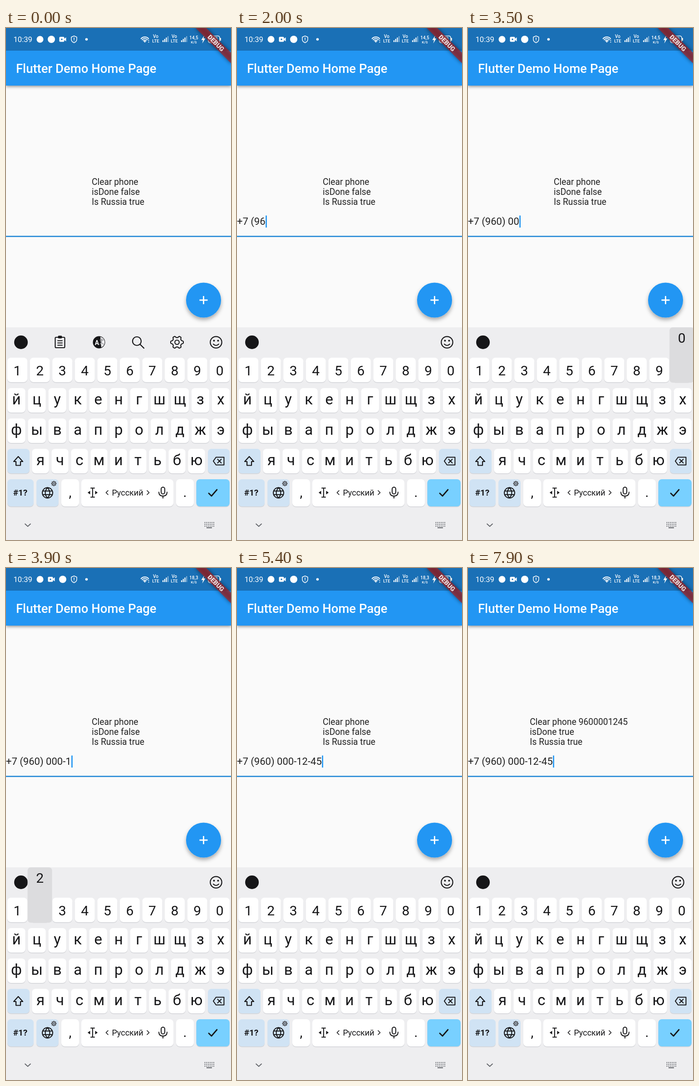
An HTML page for the animation above (8 s loop, 496x1129 px).

```html
<!DOCTYPE html>
<html lang="en">
<head>
<meta charset="utf-8">
<title>Phone field demo</title>
<style>
html, body { margin: 0; width: 100%; height: 100%; overflow: hidden; background: #fafafa; }
svg { display: block; width: 100vw; height: 100vh; font-family: Roboto, sans-serif; }
text { white-space: pre; }
</style>
</head>
<body>
<svg id="stage" viewBox="0 0 496 1129"></svg>
<script>
const LOOP = 8000;
const DIGITS = '9600001245';
const COMMITS = [400, 1750, 2350, 2800, 3200, 3560, 3780, 3990, 4780, 5300];
const HOLD = 120, TAP = 7300, DONE = 7500, INK = '#161618';

const rect = (x, y, w, h, fill, r = 0, extra = '') =>
  `<rect x="${x}" y="${y}" width="${w}" height="${h}" rx="${r}" fill="${fill}" ${extra}/>`;
const circle = (x, y, r, fill, extra = '') =>
  `<circle cx="${x}" cy="${y}" r="${r}" fill="${fill}" ${extra}/>`;
const text = (x, y, size, str, fill = INK, extra = '') =>
  `<text x="${x}" y="${y}" font-size="${size}" fill="${fill}" ${extra}>${str}</text>`;
const mid = (x, y, size, str, fill = INK, extra = '') =>
  text(x, y, size, str, fill, `text-anchor="middle" ${extra}`);
const line = (d, width = 2, color = INK, extra = '') =>
  `<path d="${d}" fill="none" stroke="${color}" stroke-width="${width}" stroke-linecap="round" stroke-linejoin="round" ${extra}/>`;
const solid = (d, fill) => `<path d="${d}" fill="${fill}"/>`;
const at = (x, y, body) => `<g transform="translate(${x} ${y})">${body}</g>`;
const group = (id, body = '') => `<g id="${id}">${body}</g>`;

function gear(r, depth, teeth) {
  let d = '';
  for (let i = 0; i < 72; i++) {
    const a = i / 72 * 2 * Math.PI;
    const wave = Math.max(-1, Math.min(1, 1.7 * Math.cos(a * teeth)));
    const q = r + depth * wave;
    d += (i ? 'L' : 'M') + (q * Math.cos(a)).toFixed(2) + ' ' + (q * Math.sin(a)).toFixed(2);
  }
  return d + 'Z';
}

function signal(x, lit) {
  let out = '';
  for (let i = 0; i < 4; i++) {
    const h = 4 + i * 3;
    out += rect(x + i * 3.7, 31 - h, 2.2, h, '#fff', 0.5, i < lit ? '' : 'opacity=".45"');
  }
  return out;
}

const lte = x => mid(x, 22, 10, 'Vo', '#fff', 'font-weight="500"') +
  mid(x, 32, 9.5, 'LTE', '#fff', 'font-weight="500"');

function statusBar() {
  const wifi = [4, 7.5, 11].map(r => {
    const c = r * 0.75, s = r * 0.68;
    return line(`M${-c} ${-s}A${r} ${r} 0 0 1 ${c} ${-s}`, 2, '#fff');
  }).join('');
  return rect(0, 0, 496, 50, '#1a70b6') +
    text(16.5, 31, 16.6, '10:39', '#fff') +
    circle(75, 25, 7.5, '#fff') +
    group('badge', circle(0, 25, 8, '#fff')) +
    group('camera', rect(-7.5, 19.5, 11, 11, '#fff', 2) + solid('M3 24L7.5 20.5V29.5L3 26Z', '#fff') +
      circle(-2, 25, 1.7, '#1a70b6')) +
    at(150, 25, line('M0 -7.5L6 -5V0Q6 5 0 7.5Q-6 5 -6 0V-5Z', 1.5, '#fff') + line('M0 -3.5V1M0 3.4V3.6', 1.5, '#fff')) +
    circle(177.5, 25, 2.8, '#fff') +
    at(306, 31, wifi + circle(0, -1, 1.8, '#fff')) + line('M314.5 27V27.2M314.5 31V31.2', 2, '#fff') +
    lte(330) + signal(345, 3) + lte(371) + signal(386, 3) +
    `<text id="speed" x="414" y="25" font-size="10" fill="#fff" text-anchor="middle" font-weight="500"></text>` +
    mid(414, 34, 8, 'K/S', '#fff', 'font-weight="500"') +
    solid('M437 16L430.500 26.500H434.500L432.500 34L439.500 23H435.500Z', '#fff') +
    rect(446, 17.5, 25, 15, 'none', 4, 'stroke="#fff" stroke-width="1.6"') +
    rect(448, 19.5, 18, 11, '#fff', 2, 'opacity=".75"') + rect(472, 22, 2, 6, '#fff') +
    mid(458.5, 29.5, 12, '82', '#1a70b6', 'font-weight="700"');
}

function page() {
  return rect(0, 0, 496, 660, '#fafafa') +
    rect(0, 50, 496, 77, '#2196f3', 0, 'filter="url(#barShadow)"') +
    statusBar() +
    text(22, 98.5, 27.5, 'Flutter Demo Home Page', '#fff', 'font-weight="500"') +
    group('info') +
    '<text id="phone" x="0" y="434.3" font-size="22" fill="#222"></text>' +
    rect(0, 413.5, 2.7, 26.5, '#2196f3', 0, 'id="caret"') +
    rect(0, 458.2, 496, 2.7, '#2a8cd8') +
    circle(435.5, 600, 38.6, '#2196f3', 'filter="url(#fabShadow)"') +
    circle(435.5, 600, 0, '#fff', 'id="ripple"') +
    line('M426.500 600H444.500M435.500 591V609', 2.8, '#fff', 'style="stroke-linecap:butt"') +
    at(496, 0, '<g transform="rotate(45)">' +
      rect(-55, 38.6, 110, 16.5, '#000', 0, 'opacity=".5" filter="url(#blur)"') +
      rect(-55, 38.6, 110, 16.5, '#b71c1c', 0, 'opacity=".63"') +
      mid(0, 51.8, 14, 'DEBUG', '#fff', 'font-weight="900" opacity=".85"') + '</g>');
}

const key = (x, y, w, h = 54, fill = '#fff') =>
  rect(x, y + 1.5, w, h, '#d3d4d8', 8) + rect(x, y, w, h, fill, 8);

function letters(str, first, pitch, width, y) {
  return [...str].map((c, i) => {
    const x = first + i * pitch;
    return key(x - width / 2, y, width) + mid(x, y + 36, 33, c);
  }).join('');
}

const keyX = d => 25 + (d + 9) % 10 * 49.58;

function keyboard() {
  let out = rect(0, 660, 496, 469, '#eeeef0') + circle(33, 693, 15, INK);
  out += at(463, 693, circle(0, 0, 12.7, 'none', `stroke="${INK}" stroke-width="2.2"`) +
    circle(-4.5, -3.5, 1.9, INK) + circle(4.5, -3.5, 1.9, INK) + line('M-6 4Q0 10 6 4'));
  out += group('tools', tools()) + group('words', words());
  for (let d = 0; d < 10; d++)
    out += key(keyX(d) - 22, 727, 44) + mid(keyX(d), 765.5, 30, d);
  out += letters('йцукенгшщзх', 23, 45.05, 39.5, 794) + letters('фывапролджэ', 23, 45.05, 39.5, 861) +
    letters('ячсмитьбю', 76, 43, 37.5, 928);
  const blue = '#d0e3f4';
  out += key(3, 928, 49, 54, blue) + key(445, 928, 48, 54, blue);
  out += at(27, 955, line('M0 -10L10 1H5V9.500H-5V1H-10Z', 2.2));
  out += at(469, 955, line('M-12 0L-6 -8.500H11.500V8.500H-6Z', 2.1) + line('M-2.500 -4L5.500 4M5.500 -4L-2.500 4', 2.1));
  out += key(3, 995, 58, 60, blue) + mid(31.5, 1031, 19, '#1?', INK, 'font-weight="600"');
  out += key(67, 995, 49, 60, blue) + at(91.5, 1025, line('M-11.500 0A11.500 11.500 0 1 0 11.500 0A11.500 11.500 0 1 0 -11.500 0ZM0 -11.500Q-10 0 0 11.500Q10 0 0 -11.500M-10.500 -4H10.500M-10.500 4H10.500'));
  out += at(105.5, 1004.5, line(gear(4.2, 1.1, 8), 1.5, '#55585e') + circle(0, 0, 1.6, '#55585e'));
  out += key(122, 995, 39, 60) + mid(141.5, 1034, 30, ',') + key(375, 995, 39, 60) + mid(394.5, 1034, 30, '.');
  out += key(166, 995, 203, 60) + mid(268, 1031, 18, 'Русский');
  out += line('M225 1020L220.500 1024.500L225 1029M311 1020L315.500 1024.500L311 1029', 1.6);
  out += at(191, 1024.5, line('M-4 -10H4M0 -10V10M-4 10H4') + solid('M-11 0L-5.500 -4V4ZM11 0L5.500 -4V4Z', INK));
  out += at(346, 1024.5, rect(-4, -12, 8, 15, 'none', 4, `stroke="${INK}" stroke-width="2"`) +
    line('M-9 -1Q-9 7.500 0 7.500Q9 7.500 9 -1M0 7.500V12'));
  out += key(419.5, 995, 73.5, 60, '#78d0ff') + line('M447 1026L453 1032L465 1018', 2.8);
  out += line('M42 1093.500L48 1099L54 1093.500', 1.8, '#606368');
  for (let r = 0; r < 3; r++)
    for (let c = 0; c < 6; c++) out += rect(437.5 + c * 3.9, 1089.5 + r * 4, 2, 2, '#606368');
  out += rect(442, 1101, 12, 2, '#606368');
  return out + group('popup', rect(-27, 660, 54, 122, '#dcdcde', 7) + mid(0, 694, 30, '', INK, 'id="popDigit"'));
}

function tools() {
  return at(119, 693, rect(-10.5, -11, 21, 23, 'none', 2, `stroke="${INK}" stroke-width="2.2"`) +
      rect(-4.5, -14.5, 9, 6, INK, 2) + line('M-5 -3.500H5M-5 1.500H5M-5 6.500H5', 1.9)) +
    at(205, 693, circle(0, 0, 13.5, INK) + solid('M3 -12A12.200 12.200 0 0 1 5 11.200Z', '#eeeef0') +
      mid(-4.5, 6, 14, 'A', '#fff', 'font-weight="600"') +
      line('M2 -5H10M6 -8V-5Q6 1 2 4M3.500 -2Q6 3 10 4', 1.5, '#8a8b8f')) +
    at(291, 693, circle(-2.5, -2.5, 9.5, 'none', `stroke="${INK}" stroke-width="2.2"`) + line('M4.500 4.500L13 13', 2.4)) +
    at(377, 693, line(gear(12.2, 1.8, 6), 2.1) + circle(0, 0, 4.8, 'none', `stroke="${INK}" stroke-width="2.1"`));
}

function words() {
  const list = [['хорошо', 73, 43], ['здравствуйте', 151, 39.5], ['за', 223, 43], ['завтра', 300, 32], ['да', 364, 43]];
  return list.map(([w, x, cut]) =>
    `<svg x="${x}" y="670" width="${cut}" height="45" overflow="hidden">${text(0, 32, 23, w)}</svg>`).join('');
}

const shadow = (id, dy, dev, alpha) => `<filter id="${id}" x="-30%" y="-30%" width="160%" height="170%">
  <feDropShadow dx="0" dy="${dy}" stdDeviation="${dev}" flood-color="#000" flood-opacity="${alpha}"/></filter>`;

const stage = document.getElementById('stage');
stage.innerHTML = `<defs>${shadow('barShadow', 2.5, 3, 0.4)}${shadow('fabShadow', 5, 4.5, 0.32)}
  <filter id="blur" x="-20%" y="-120%" width="140%" height="340%"><feGaussianBlur stdDeviation="4"/></filter></defs>` +
  page() + keyboard();

const el = id => document.getElementById(id);
const show = (id, on) => el(id).setAttribute('display', on ? 'inline' : 'none');
const put = (id, x) => el(id).setAttribute('transform', `translate(${x} 0)`);
function setText(id, str) {
  if (el(id).textContent !== str) el(id).textContent = str;
}

function format(d) {
  if (!d) return '';
  let out = '+7 (' + d.slice(0, 3);
  if (d.length > 3) out += ') ' + d.slice(3, 6);
  if (d.length > 6) out += '-' + d.slice(6, 8);
  if (d.length > 8) out += '-' + d.slice(8);
  return out;
}

let infoDone = null;
function setInfo(done) {
  if (done === infoDone) return;
  infoDone = done;
  const rows = ['Clear phone ' + (done ? DIGITS : ''), 'isDone ' + done, 'Is Russia true'];
  el('info').innerHTML = rows.map((s, i) => text(done ? 136.3 : 189, 345.8 + i * 21.9, 19.3, s, '#222')).join('');
}

function update(t) {
  const count = COMMITS.filter(c => c <= t).length;
  const done = t >= DONE;
  setInfo(done);
  setText('phone', format(DIGITS.slice(0, count)));
  setText('speed', t < 3900 ? '14,5' : '18,3');

  // The caret restarts its blink after every edit.
  const since = t - (done ? DONE : COMMITS[count - 1]);
  show('caret', count > 0 && Math.floor(since / 500) % 2 === 0);
  el('caret').setAttribute('x', el('phone').getComputedTextLength() + 0.5);

  const swapped = t >= COMMITS[0];
  put('badge', swapped ? 125 : 100);
  put('camera', swapped ? 100 : 125);
  show('tools', !swapped);
  show('words', swapped && t < COMMITS[1] - HOLD);

  const pressed = count < DIGITS.length && t >= COMMITS[count] - HOLD;
  show('popup', pressed);
  if (pressed) {
    put('popup', keyX(+DIGITS[count]));
    setText('popDigit', DIGITS[count]);
  }

  const p = (t - TAP) / 450;
  const live = p > 0 && p < 1;
  el('ripple').setAttribute('r', live ? 38.6 * Math.min(1, p * 1.8) : 0);
  el('ripple').setAttribute('opacity', live ? 0.24 * Math.min(1, 2 - 2 * p) : 0);
}

const start = performance.now();
function frame() {
  update((performance.now() - start) % LOOP);
  requestAnimationFrame(frame);
}
frame();
</script>
</body>
</html>
```
